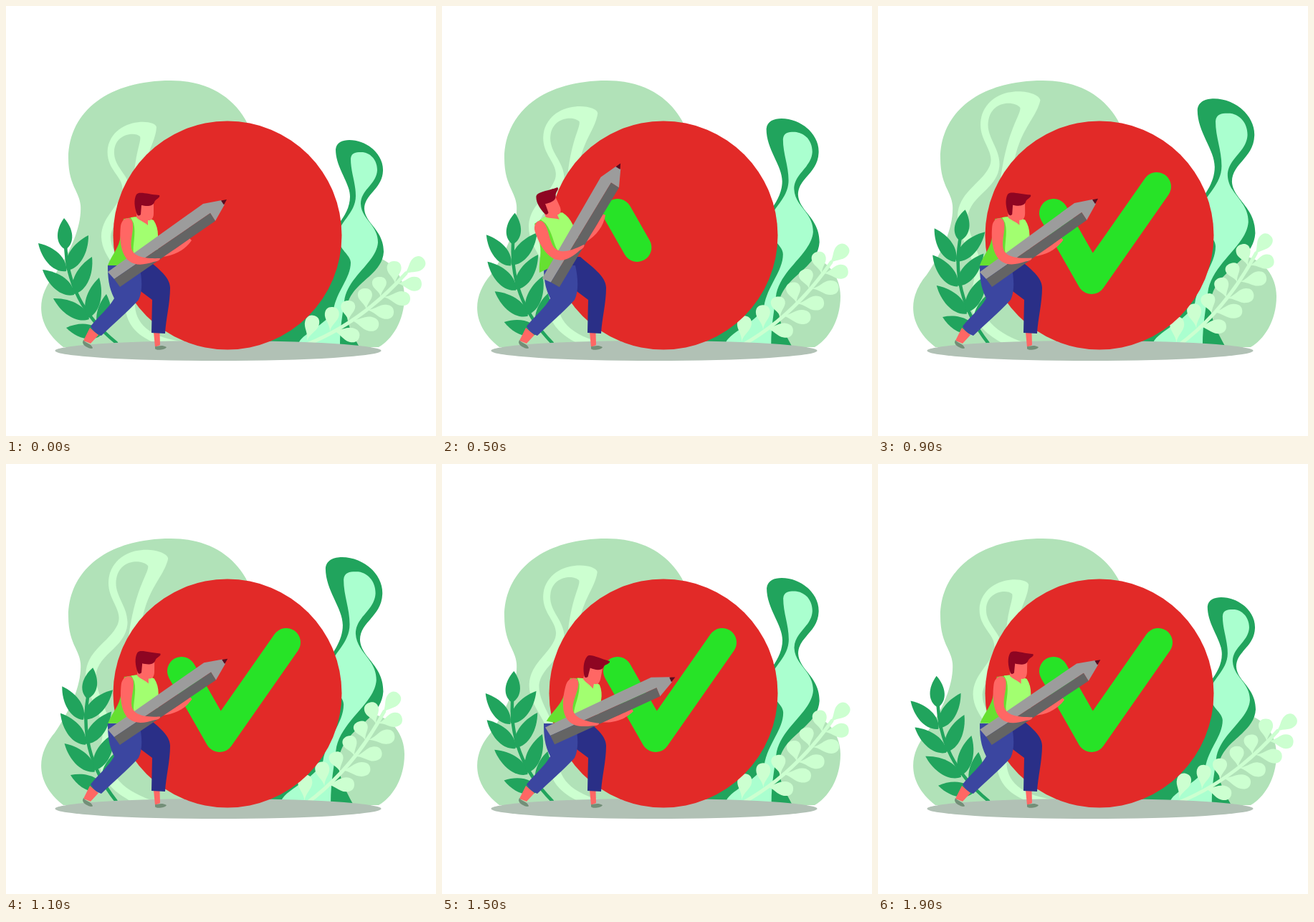
An HTML page for the animation above (2 s loop, 600 by 600 pixels).

```html
<!DOCTYPE html>
<html lang="en">
<head>
<meta charset="utf-8">
<title>Check mark</title>
<style>
html, body { margin: 0; width: 100%; height: 100%; overflow: hidden; background: #fff; }
svg { display: block; width: 100vw; height: 100vh; }
.dark { fill: #21a45d; }
.mint { fill: #aaffcf; }
.pale { fill: #ccffd0; }
.skin { fill: #ff6764; }
.shoe { fill: #738f78; }
.stem { fill: none; stroke-linecap: round; }
</style>
</head>
<body>
<svg viewBox="0 0 600 600">
  <path fill="#b1e2b8" d="M80 476C40 445 42 405 68 375C92 340 106 305 104 278C102 258 87 250 87 212C88 145 145 104 230 104C285 104 322 130 340 170L400 370C440 360 470 348 500 348C535 348 556 375 556 405C556 440 538 466 520 476Z"/>

  <path id="loop" class="pale" d="M210 169C208 157 150 156 142 198C138 230 167 238 162 260C156 282 133 295 133 322C134 355 168 370 167 405C164 430 168 470 250 480L262 470C195 465 178 440 180 410C180 375 146 350 146 322C148 298 176 285 174 258C172 235 150 225 151 203C152 178 180 175 187 182C190 192 172 215 180 300L196 300C180 215 208 200 210 169Z"/>

  <g id="fern" class="dark">
    <path class="stem" stroke="#21a45d" stroke-width="4.5" d="M154 470C112 436 84 392 83 330"/>
  </g>

  <g id="vine">
    <path class="dark" d="M460 200C461 190 470 187 479 187C504 187 527 207 526 230C525 256 500 262 500 283C501 304 527 312 527 343C525 376 483 385 476 418C473 440 482 455 492 474L360 474L360 400L440 330C450 318 480 295 480 266C480 246 460 226 460 200Z"/>
    <path class="mint" d="M481 213C482 203 491 204 498 204C511 206 518 217 518 229C517 249 495 256 495 276C496 298 519 305 519 330C517 358 476 378 472 412C470 430 466 448 466 472L408 472C410 458 448 445 457 424C461 398 481 380 481 358C481 347 464 340 463 322C463 302 488 290 488 265C488 246 481 232 481 213Z"/>
  </g>

  <g id="branch" class="pale">
    <path class="stem" stroke="#ccffd0" stroke-width="5" d="M420 472C475 450 520 415 558 373"/>
  </g>

  <ellipse cx="296" cy="481" rx="227.5" ry="14" fill="#b1c1b5"/>
  <circle cx="309" cy="320" r="159.5" fill="#e22a28"/>
  <path id="check" d="M245 289L298 382L391 249" pathLength="1" fill="none" stroke="#27e327" stroke-width="40" stroke-linecap="round" stroke-linejoin="round"/>

  <path class="skin" d="M117 449L129 459L118 471L108 467ZM206 455H214.500L215 473L208 476Z"/>
  <path class="shoe" d="M108 466C111 471 118 470 121 477C120 480 107 475 107 469ZM208 475C213 475 217 472 224 476C223 480 208 481 208 478Z"/>
  <path fill="#2a2f87" d="M180 350L193 350C208 363 229 377 229 393C229 415 223 437 222 457L203 456L204 410L180 392Z"/>
  <path fill="#3b46a0" d="M142 362L186 362C190 380 191 398 185 410C170 427 150 443 133 460Q123 457 118 447C130 432 143 422 151 408C143 392 142 378 142 362Z"/>

  <g id="body">
    <path class="skin" d="M214 350C230 344 245 333 256 324L259 327C250 340 236 348 218 350Z"/>
    <path fill="#66e031" d="M164 297L182 294L188 345L166 362L142 362C148 346 158 338 160 320Z"/>
    <path fill="#a2ff70" d="M174 295L192 293L206 299C210 305 212 312 212 320V340L178 345C176 335 182 318 178 303Z"/>
    <path class="skin" d="M183 282L182 295C187 300 193 301 198 306V299C204 300 206 295 206 289V272H187Z"/>
    <path fill="#8e0522" d="M182 263C186 258 198 263 214 264C216 268 208 269 207 274C204 281 194 279 189 278L188 291Q185 294 183 291C179 281 178 270 182 263Z"/>
    <path fill="#9c9c9c" d="M142 371L275 276L301 271L305 277L292 300L285 289L151 381Z"/>
    <path fill="#646464" d="M151 381L285 289L292 300L159 392Z"/>
    <path fill="#5a0a1e" d="M300 271.500L308 270L304 277.500Z"/>
    <path class="skin" d="M160 307C162 294 176 292 177 304C178 315 173 327 175 338C178 349 190 353 215 352Q215 356 206 357C194 361 181 363 172 356C160 347 158 325 160 307Z"/>
  </g>
</svg>
<script>
const $ = id => document.getElementById(id);
const LOOP = 2000, STEP = 100;

// Leaf outlines pointing along +x, from stem to tip
const pointed = (l, w) =>
  `M0 0C${.2 * l} ${-1.25 * w} ${.65 * l} ${-1.1 * w} ${l} 0C${.65 * l} ${1.1 * w} ${.2 * l} ${1.25 * w} 0 0Z`;
const rounded = (l, w) =>
  `M0 0C${.3 * l} ${-.1 * w} ${.45 * l} ${-w} ${.7 * l} ${-w}C${.9 * l} ${-w} ${l} ${-.6 * w} ${l} 0` +
  `C${l} ${.6 * w} ${.9 * l} ${w} ${.7 * l} ${w}C${.45 * l} ${w} ${.3 * l} ${.1 * w} 0 0Z`;

function addLeaves(group, shape, width, leaves) {
  for (const [x, y, tipX, tipY] of leaves) {
    const dx = tipX - x, dy = tipY - y;
    const leaf = document.createElementNS(group.namespaceURI, "path");
    leaf.setAttribute("d", shape(Math.hypot(dx, dy), width));
    leaf.setAttribute("transform", `translate(${x} ${y}) rotate(${Math.atan2(dy, dx) * 180 / Math.PI})`);
    group.append(leaf);
  }
}

addLeaves($("fern"), pointed, 11.5, [
  [83, 340, 81, 296],
  [84, 370, 45, 331], [85, 369, 115, 320],
  [95, 403, 51, 368], [95, 402, 120, 350],
  [116, 437, 66, 408], [115, 435, 130, 379],
  [134, 458, 84, 449], [134, 455, 140, 402]
]);
addLeaves($("branch"), rounded, 10, [
  [555, 375, 583, 353],
  [543, 388, 541, 356], [545, 387, 580, 388],
  [523, 406, 520, 378], [526, 406, 564, 409],
  [503, 424, 500, 394], [503, 424, 541, 428],
  [478, 440, 477, 411], [480, 438, 520, 446],
  [452, 454, 456, 420], [455, 452, 493, 462],
  [420, 467, 430, 432]
]);

const clamp = v => Math.min(1, Math.max(0, v));
const ease = (t, from, to) => (1 - Math.cos(Math.PI * clamp((t - from) / (to - from)))) / 2;
const place = (id, transform) => $(id).setAttribute("transform", transform);
const scaleAt = (x, y, s) => `translate(${x} ${y}) scale(${s}) translate(${-x} ${-y})`;

function draw(t) {
  const sway = (1 - Math.cos(2 * Math.PI * t / 1980)) / 2;
  place("loop", `rotate(${10 * sway} 318 317) ${scaleAt(318, 317, 1 + .13 * sway)}`);
  place("fern", `rotate(${13.3 * sway} 153 468)`);
  place("vine", scaleAt(530, 470, 1 + .208 * sway));
  place("branch", `rotate(${-14.4 * sway} 430 483)`);

  const back = ease(t, 0, 505) - ease(t, 505, 940);
  const forward = ease(t, 1000, 1670) - ease(t, 1670, 1960);
  place("body", `rotate(${12 * forward - 24.4 * back} 162 381)`);

  const drawn = clamp((t - 165) / 740) ** 2;
  const check = $("check");
  check.style.display = drawn ? "" : "none";
  check.setAttribute("stroke-dasharray", `${drawn} 2`);
}

const start = performance.now();
function tick() {
  const t = (performance.now() - start) % LOOP;
  draw(Math.floor(t / STEP) * STEP);
  requestAnimationFrame(tick);
}
tick();
</script>
</body>
</html>
```
